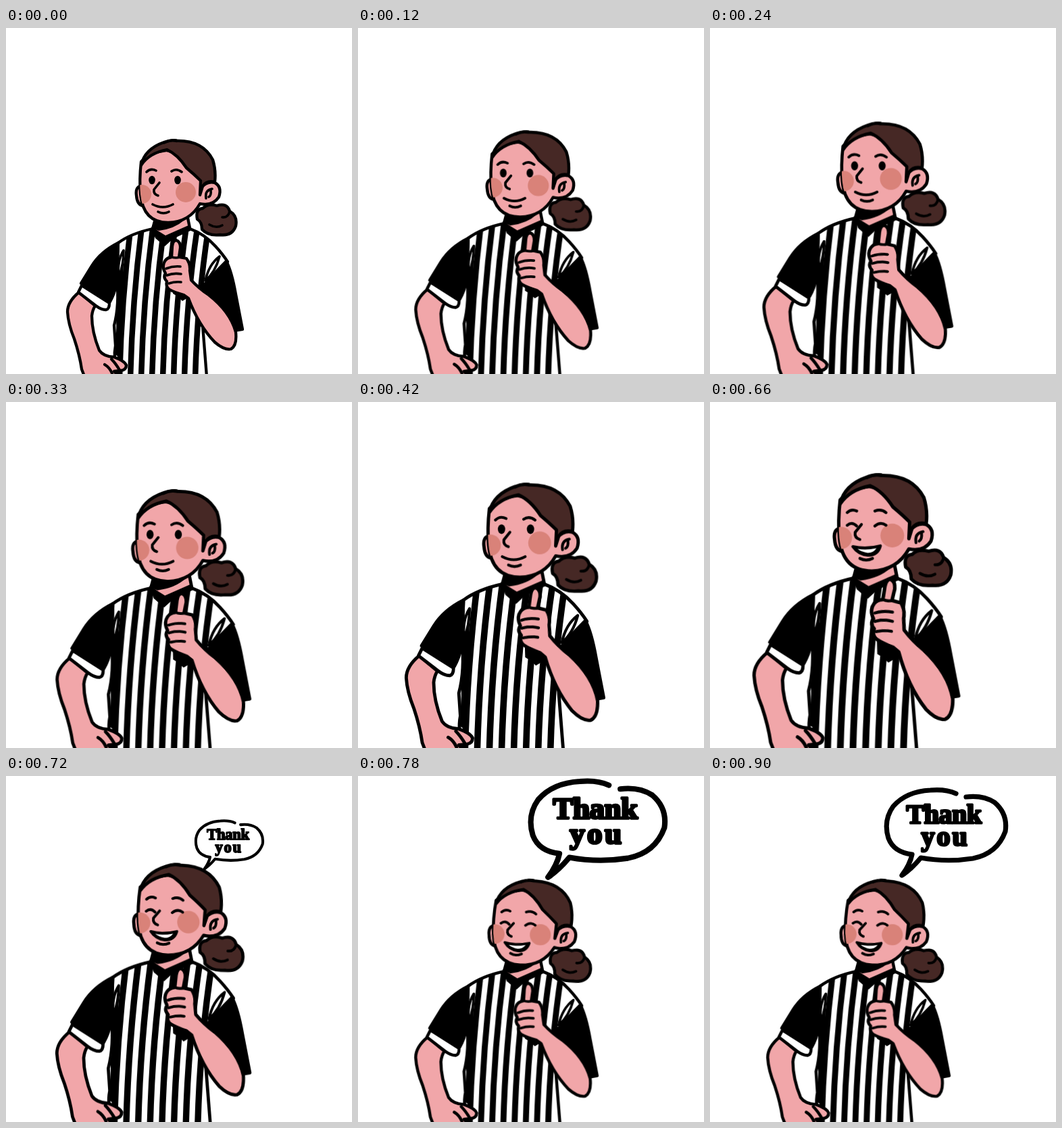
An HTML page for the animation above (1800 ms loop, 512 by 512 pixels).

```html
<!DOCTYPE html>
<html lang="en">
<head>
<meta charset="utf-8">
<title>Thank you</title>
<style>
  html, body { margin: 0; width: 100%; height: 100%; overflow: hidden; background: #fff; }
  svg { display: block; width: 100vw; height: 100vh; }
  .ink { fill: none; stroke: #000; stroke-width: 4.3; stroke-linecap: round; stroke-linejoin: round; }
  .skin { fill: #f1a6a9; }
  .hair { fill: #462825; }
  .white { fill: #fff; }
  .black { fill: #000; }
  .thin { stroke-width: 3.6; }
  .cheek { fill: #d98279; }

  #man, .head, #arm, #calm, #smile, #bubble {
    transform-box: view-box;
    animation: 1800ms linear infinite;
  }
  #man { transform-origin: 244px 512px; animation-name: grow; }
  .head { transform-origin: 238px 291px; animation-name: tilt; }
  #arm { transform-origin: 328px 470px; animation-name: lift; }
  #calm { animation-name: calm; animation-timing-function: step-end; }
  #smile { animation-name: smile; animation-timing-function: step-end; }
  #bubble { transform-origin: 306px 125px; animation-name: pop; }

  /* every move advances in 30 ms steps */
  @keyframes grow {
    0% { transform: scale(1); animation-timing-function: steps(18); }
    30% { transform: scale(1.165); animation-timing-function: steps(4); }
    36.6667% { transform: scale(1.169); animation-timing-function: steps(4); }
    43.3333%, 100% { transform: scale(1.037); }
  }
  @keyframes tilt {
    0%, 36.6667% { transform: rotate(0deg); animation-timing-function: steps(4); }
    43.3333%, 100% { transform: rotate(3.5deg); }
  }
  @keyframes lift {
    0% { transform: rotate(0deg) scale(1); animation-timing-function: steps(18); }
    30%, 36.6667% { transform: rotate(5.5deg) scale(1.055); animation-timing-function: steps(4); }
    43.3333%, 100% { transform: rotate(0deg) scale(1); }
  }
  @keyframes calm {
    0% { opacity: 1; }
    31.6667%, 100% { opacity: 0; }
  }
  @keyframes smile {
    0% { opacity: 0; }
    31.6667%, 100% { opacity: 1; }
  }
  @keyframes pop {
    0%, 36.6667% { transform: scale(0); animation-timing-function: steps(4); }
    43.3333% { transform: scale(1.125); animation-timing-function: steps(4); }
    50%, 100% { transform: scale(1); }
  }
  text {
    font: 700 40px "Liberation Serif", "Times New Roman", serif;
    text-anchor: middle;
    stroke: #000;
    stroke-width: 3.2;
    stroke-linejoin: round;
  }
</style>
</head>
<body>
<svg viewBox="0 0 512 512">
  <defs>
    <path id="shirt" d="M217 297Q185 304 166 318L164 370Q168 410 160 440L162 470Q158 490 166 516H297L291 440L288 385L328 346Q321 335 310 323Q294 305 272 297Z"/>
    <clipPath id="shirtClip"><use href="#shirt"/></clipPath>
    <clipPath id="faceClip">
      <path d="M200 198Q197 225 199 246Q203 288 240 288Q272 287 287 256L291 226Q262 185 237 181Q212 184 200 198Z"/>
    </clipPath>
  </defs>

  <g id="man">
    <!-- shirt -->
    <use href="#shirt" class="ink white"/>
    <g clip-path="url(#shirtClip)">
      <g id="stripes" class="ink" style="stroke-width:8.5;stroke-linecap:butt"></g>
      <path d="M164 368L174 345L172 420L171 490L160 482Q166 440 161 412Z"/>
    </g>
    <path d="M246 362H269L271 398L261 404L255 398L247 393Z"/>
    <path class="ink white thin" d="M174 329Q164 345 167 368Q174 351 174 329Z"/>

    <!-- sleeves -->
    <path class="ink black" d="M166 318Q140 331 127 352L111 378L154 405Q167 382 165 350Z"/>
    <path class="ink black" d="M326 345Q334 360 340 394L350 446L338 448L289 386Q305 366 326 345Z"/>
    <path class="ink white thin" d="M316 338Q300 350 295 374Q310 361 316 338Z"/>

    <!-- arm on the hip -->
    <path class="ink skin" d="M108 391Q91 405 91 420Q92 438 101 460Q109 484 112 505L117 518H168L160 508L170 507Q178 506 178 499Q176 493 160 487Q144 486 138 477Q127 450 127 426Q128 417 132 411Z"/>
    <path class="ink" d="M156 490Q162 496 168 506M146 498Q153 502 157 511"/>
    <path class="ink white" d="M112 381L153 407Q153 416 148 417Q141 417 133 411L107 391Z"/>

    <!-- bun -->
    <g class="head">
      <path class="ink hair" d="M283 283Q280 268 291 267Q299 259 312 263Q327 258 331 271Q343 278 340 293Q335 308 317 306Q299 308 290 298Q290 287 283 283Z"/>
      <path class="ink thin" d="M301 291Q311 297 320 292M320 280Q329 281 331 271"/>
    </g>

    <!-- neck and collar -->
    <path class="ink skin" d="M221 282L217 297L235 312L272 296L268 276Z"/>
    <path d="M220 282L216 296L226 300Q250 297 264 284Z"/>
    <path d="M215 294L236 307L270 292L275 299L247 312L235 323L221 311Z"/>

    <g class="head">
      <!-- ears and face -->
      <path class="ink skin" d="M200 234Q191 235 193 248Q194 262 203 263Z"/>
      <path class="ink skin" d="M200 198Q197 225 199 246Q203 288 240 288Q272 287 287 260Q306 264 315 250Q320 235 309 229Q298 226 289 236L291 222Q262 185 237 181Q212 184 200 198Z"/>
      <g clip-path="url(#faceClip)" class="cheek">
        <circle cx="201" cy="246" r="14"/>
        <circle cx="266" cy="243" r="15"/>
      </g>
      <path class="ink thin" d="M296 252Q294 240 305 238M303 240Q304 248 300 250"/>
      <!-- hair -->
      <path class="ink hair" d="M200 203Q205 179 234 169Q244 165 252 167Q291 166 306 195Q311 211 309 228Q297 225 291 234L287 247L288 226Q279 217 267 207Q254 187 238 180Q212 185 200 203Z"/>
      <path class="ink thin" d="M234 170Q243 165 252 166"/>

      <path class="ink thin" d="M227 229L219 239Q218 246 225 248M225 272Q233 276 241 272"/>
      <g id="calm">
        <ellipse cx="216" cy="225" rx="4.8" ry="6.3"/>
        <ellipse cx="254" cy="225" rx="4.8" ry="6.3"/>
        <path class="ink thin" d="M208 213Q214 207 222 211M245 212Q252 207 260 213M217 261Q232 269 247 261"/>
      </g>
      <g id="smile">
        <path class="ink thin" d="M209 214Q214 209 221 212M244 212Q252 209 258 214M209 230Q215 225 221 231M244 231Q251 225 258 230"/>
        <path class="ink thin black" d="M216 257Q233 261 251 256Q248 268 235 268Q223 267 216 257Z"/>
        <path class="white" d="M222 260Q234 262 246 259Q242 265 235 265Q227 264 222 260Z"/>
      </g>
    </g>

    <!-- thumbs up -->
    <g id="arm">
      <path class="ink skin" d="M245 339L246 323Q247 314 252 314Q258 316 258 325L256 339L267 341Q273 349 272 359L274 373Q285 385 300 395Q332 420 340 450Q342 470 333 475Q323 477 309 465Q285 440 270 400L263 395Q249 391 242 387Q236 383 238 375Q232 369 236 363Q230 353 235 345Q238 340 245 339Z"/>
      <path class="ink thin" d="M245 339Q252 341 257 339M237 356Q247 352 258 353M238 366Q248 362 259 364M241 378Q250 375 259 376"/>
    </g>
  </g>

  <g id="bubble">
    <path class="ink" style="stroke-width:7.2" d="M364 26Q349 19 326 21Q290 23 271 45Q256 66 264 92Q272 113 299 116Q296 131 284 147Q298 138 312 121Q350 128 389 122Q425 115 437 82Q441 56 421 39Q404 28 379 31"/>
    <path d="M297 116L282 149Q284 151 289 148L304 130L292 139Z"/>
    <text x="346" y="70" letter-spacing="-0.5">Thank</text>
    <text x="348" y="103" letter-spacing="3">you</text>
  </g>
</svg>
<script>
  const stripes = document.getElementById('stripes');
  const ns = 'http://www.w3.org/2000/svg';
  for (let i = 0; i < 8; i++) {
    const top = 185 + 16.5 * i;
    const low = 168 + 16 * i;
    const stripe = document.createElementNS(ns, 'path');
    stripe.setAttribute('d', `M${top} 290Q${low + 3} 400 ${low} 518`);
    stripes.append(stripe);
  }
</script>
</body>
</html>
```
